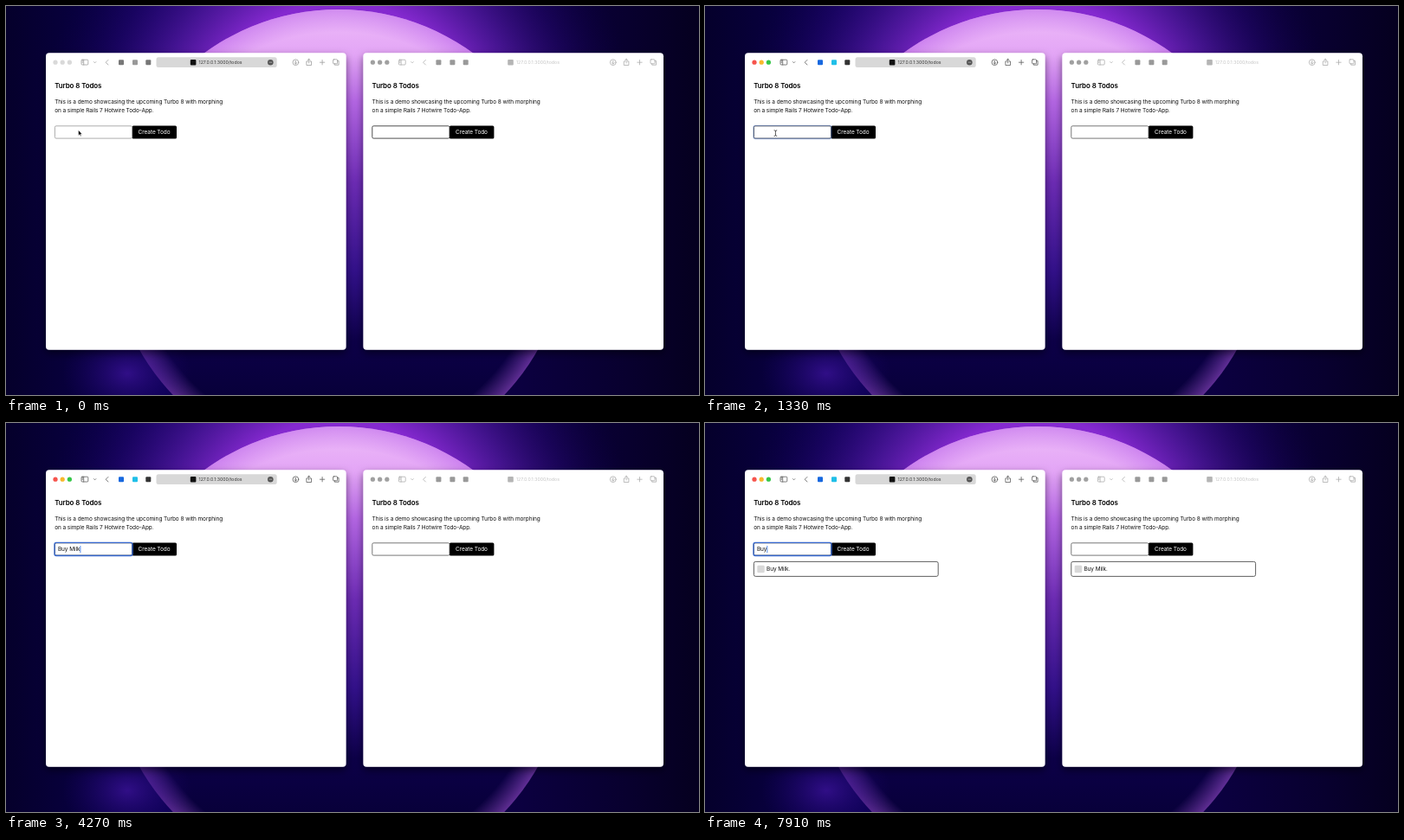
These frames come from a looping animation (800x450 px, 8000 ms). An HTML page:

```html
<!DOCTYPE html>
<html lang="en">
<head>
<meta charset="utf-8">
<title>Turbo 8 Todos</title>
<style>
html, body { margin: 0; width: 100%; height: 100%; overflow: hidden; background: #070030; }
svg { display: block; width: 800px; height: 450px; }
text { font: 6.5px Inter, "Liberation Sans", sans-serif; letter-spacing: -.011em; fill: #111; white-space: pre; }
.title { font-size: 7.95px; font-weight: 600; fill: #000; }
.url { font-size: 5.2px; letter-spacing: 0; }
.icon { fill: none; stroke-width: .75; stroke-linecap: round; stroke-linejoin: round; }
</style>
</head>
<body>
<svg id="stage" viewBox="0 0 800 450" xmlns="http://www.w3.org/2000/svg">
  <defs>
    <linearGradient id="night">
      <stop offset="0" stop-color="#05002b"/><stop offset=".22" stop-color="#0b0053"/>
      <stop offset=".6" stop-color="#0e0050"/><stop offset=".9" stop-color="#08002e"/>
      <stop offset="1" stop-color="#05001f"/>
    </linearGradient>
    <radialGradient id="halo" gradientUnits="userSpaceOnUse" cx="384" cy="150" r="345">
      <stop offset=".45" stop-color="#8b2bd6" stop-opacity=".95"/>
      <stop offset=".62" stop-color="#571aa8" stop-opacity=".75"/>
      <stop offset=".8" stop-color="#2a0878" stop-opacity=".45"/>
      <stop offset="1" stop-color="#10004c" stop-opacity="0"/>
    </radialGradient>
    <linearGradient id="moon" gradientUnits="userSpaceOnUse" x1="0" y1="3" x2="0" y2="450">
      <stop offset="0" stop-color="#eebcf8"/><stop offset=".12" stop-color="#e3a5f6"/>
      <stop offset=".24" stop-color="#b466e4"/><stop offset=".45" stop-color="#6c2bb4"/>
      <stop offset=".68" stop-color="#32108a"/><stop offset=".86" stop-color="#0c0048"/>
      <stop offset="1" stop-color="#08003a"/>
    </linearGradient>
    <radialGradient id="moonEdge" gradientUnits="userSpaceOnUse" cx="384" cy="268" r="264">
      <stop offset=".9" stop-color="#b45be8" stop-opacity="0"/>
      <stop offset="1" stop-color="#b45be8" stop-opacity=".5"/>
    </radialGradient>
    <radialGradient id="lowGlow">
      <stop offset="0" stop-color="#3a1296" stop-opacity=".8"/>
      <stop offset="1" stop-color="#1c0468" stop-opacity="0"/>
    </radialGradient>
    <filter id="shadow" x="-10%" y="-10%" width="120%" height="120%">
      <feDropShadow dx="0" dy="4" stdDeviation="5" flood-color="#000" flood-opacity=".5"/>
    </filter>
  </defs>
  <rect width="800" height="450" fill="url(#night)"/>
  <rect width="800" height="450" fill="url(#halo)"/>
  <circle cx="384" cy="268" r="264" fill="url(#moon)"/>
  <circle cx="384" cy="268" r="264" fill="url(#moonEdge)"/>
  <ellipse cx="140" cy="425" rx="75" ry="55" fill="url(#lowGlow)"/>
  <g id="windows"></g>
  <path id="arrow" d="M0 0V6.4L1.5 5.1 2.5 7.3 3.5 6.9 2.5 4.7H4.4Z" fill="#000" stroke="#fff" stroke-width=".5"/>
  <path id="beam" d="M-1.4 -3.2Q0 -3.2 0 -2.4V2.6Q0 3.4 -1.4 3.4M1.4 -3.2Q0 -3.2 0 -2.4M0 2.6Q0 3.4 1.4 3.4" class="icon" stroke="#222"/>
</svg>
<script>
const LOOP = 8000;
const ACTIVATE = 1260, SUBMIT = 5110;
const RIGHT_OFFSET = 366.4;
const $ = id => document.getElementById(id);

const rect = (x, y, w, h, r, attrs) =>
  `<rect x="${x}" y="${y}" width="${w}" height="${h}" rx="${r}" ${attrs}/>`;
const label = (x, y, text, attrs = '') => `<text x="${x}" y="${y}" ${attrs}>${text}</text>`;

function toolbarIcons() {
  return `<g class="icon" data-part="icons">
    ${rect(87, 62.2, 7.8, 5.8, 1, '')}<path d="M89.7 62.2V68M88 63.8H88.8M88 65.2H88.8"/>
    <path d="M101.4 64.6L102.6 65.8 103.8 64.6M118 62.4L115.2 65.2 118 68"/>
    <circle cx="334.4" cy="65.2" r="3.4"/><path d="M334.4 63.3V67M333 65.7L334.4 67 335.8 65.7"/>
    <path d="M348.4 64H346.9V68.5H352.5V64H351M349.7 66V61.3M348.2 62.7L349.7 61.3 351.2 62.7"/>
    <path d="M362.4 65.2H367.8M365.1 62.5V67.9"/>
    ${rect(377.6, 61.8, 5, 5, .8, '')}<path d="M379.3 66.8V68.2H384.1V63.4H382.6"/>
  </g>`;
}

function buildWindow(name, offset) {
  const left = name === 'left';
  const dots = [57, 65.2, 73.4].map(x => `<circle data-part="dot" cx="${x}" cy="65.2" r="2.6"/>`).join('');
  const extensions = [133, 149, 164.3].map(x => rect(x - 3, 62.2, 6, 6, 1, 'data-part="extension"')).join('');
  const pill = left ? rect(173.5, 59.2, 139.2, 11.8, 2.5, 'fill="#d8d8d8"') +
    `<circle cx="305.3" cy="65.2" r="3.3" fill="#555"/>
     <path d="M303.7 65.2H306.9" stroke="#ddd" stroke-width=".8" stroke-dasharray=".8 .4"/>` : '';
  return `<g id="${name}" transform="translate(${offset})">
    ${rect(46, 54.3, 346.6, 343.4, 4, 'fill="#fff" filter="url(#shadow)"')}
    ${pill}${dots}${extensions}${toolbarIcons()}
    ${rect(212.8, 61.9, 6.6, 6.6, 1, `fill="${left ? '#111' : '#b5b5b5'}"`)}
    ${label(222.6, 67.1, '127.0.0.1:3000/todos', `class="url" style="fill:${left ? '#333' : '#c4c4c4'}"`)}
    ${label(56.2, 95, 'Turbo 8 Todos', 'class="title"')}
    ${label(56.2, 112.7, 'This is a demo showcasing the upcoming Turbo 8 with morphing')}
    ${label(56.2, 122.7, 'on a simple Rails 7 Hotwire Todo-App.')}
    ${rect(145.5, 138.4, 51.5, 15, 1.5, 'fill="#000"')}
    ${label(152.6, 148.3, 'Create Todo', 'style="fill:#fff"')}
    ${rect(56.4, 138.8, 89.2, 14.3, 1.5, 'data-part="input" fill="#fff" stroke-width=".8"')}
    ${rect(56, 138.4, 90, 15.1, 2, 'data-part="ring" fill="none" stroke="#3567cf" stroke-width="1.3"')}
    ${label(59.9, 148.3, '', 'data-part="value"')}
    ${rect(0, 142, .8, 8.2, 0, 'data-part="caret" fill="#2d6fe0"')}
    <g data-part="todo">
      ${rect(56.4, 160.4, 212.8, 17, 2, 'fill="#fff" stroke="#444" stroke-width=".85"')}
      ${rect(60.3, 164.8, 8.4, 8.4, 1.2, 'fill="#d8d8d8"')}
      ${label(71, 171.3, 'Buy Milk.')}
    </g>
  </g>`;
}

$('windows').innerHTML = buildWindow('left', 0) + buildWindow('right', RIGHT_OFFSET);

const parts = (win, part) => [...$(win).querySelectorAll(`[data-part=${part}]`)];
const paint = (win, part, attr, colors) =>
  parts(win, part).forEach((el, i) => el.setAttribute(attr, [].concat(colors)[i] ?? colors));
const show = (el, on) => el.setAttribute('visibility', on ? 'visible' : 'hidden');

const value = parts('left', 'value')[0];
const caret = parts('left', 'caret')[0];
const todos = ['left', 'right'].map(win => parts(win, 'todo')[0]);
const ring = parts('left', 'ring')[0];
show(parts('right', 'ring')[0], false);
show(parts('right', 'caret')[0], false);
paint('right', 'dot', 'fill', '#a0a0a0');
paint('right', 'extension', 'fill', '#999');
paint('right', 'icons', 'stroke', '#a8a8a8');

const path = [[0, 83.5, 143.5], [280, 86, 137], [560, 86.5, 133.5], [700, 85.5, 137], [840, 83, 143.5], [980, 81, 146.5]];
const firstKeys = [2870, 3080, 3220, 3360, 3570, 3780, 4060, 4270, 4480];
const secondKeys = [7490, 7700, 7910];
// Intervals in which the idle caret is lit.
const caretOn = [[1540, 1890], [2240, 2660], [2870, 5600], [6230, 6545], [6900, 7280], [7490, LOOP]];

function pointerAt(t) {
  const next = path.findIndex(p => p[0] > t);
  if (next < 0) return path.at(-1).slice(1);
  const [a, b] = [path[next - 1], path[next]];
  const k = (t - a[0]) / (b[0] - a[0]);
  return [1, 2].map(i => a[i] + (b[i] - a[i]) * k);
}

function typedAt(t) {
  const keys = t < SUBMIT ? firstKeys : secondKeys;
  return 'Buy Milk.'.slice(0, keys.filter(key => key <= t).length);
}

let wasActive;
function setActive(active) {
  if (active === wasActive) return;
  wasActive = active;
  paint('left', 'dot', 'fill', active ? ['#f6544d', '#f8b82c', '#35c748'] : '#d9d9d9');
  paint('left', 'extension', 'fill', active ? ['#1768df', '#20bfe8', '#333'] : ['#777', '#999', '#777']);
  paint('left', 'icons', 'stroke', active ? '#555' : '#999');
  paint('left', 'input', 'stroke', active ? '#222' : '#999');
  paint('right', 'input', 'stroke', active ? '#555' : '#222');
}

function render(t) {
  const active = t >= ACTIVATE;
  setActive(active);
  ring.setAttribute('opacity', Math.max(0, Math.min(1, (t - ACTIVATE) / 210)));

  const [x, y] = pointerAt(t);
  $('arrow').setAttribute('transform', `translate(${x} ${y})`);
  $('beam').setAttribute('transform', 'translate(81.4 147)');
  show($('arrow'), !active);
  show($('beam'), active && t < firstKeys[0]);

  value.textContent = typedAt(t);
  const width = value.textContent ? value.getComputedTextLength() : 0;
  caret.setAttribute('x', 59.9 + width);
  show(caret, caretOn.some(([from, to]) => t >= from && t < to));
  todos.forEach(todo => show(todo, t >= SUBMIT));
}

const start = performance.now();
function tick() {
  render((performance.now() - start) % LOOP);
  requestAnimationFrame(tick);
}
tick();
</script>
</body>
</html>
```
